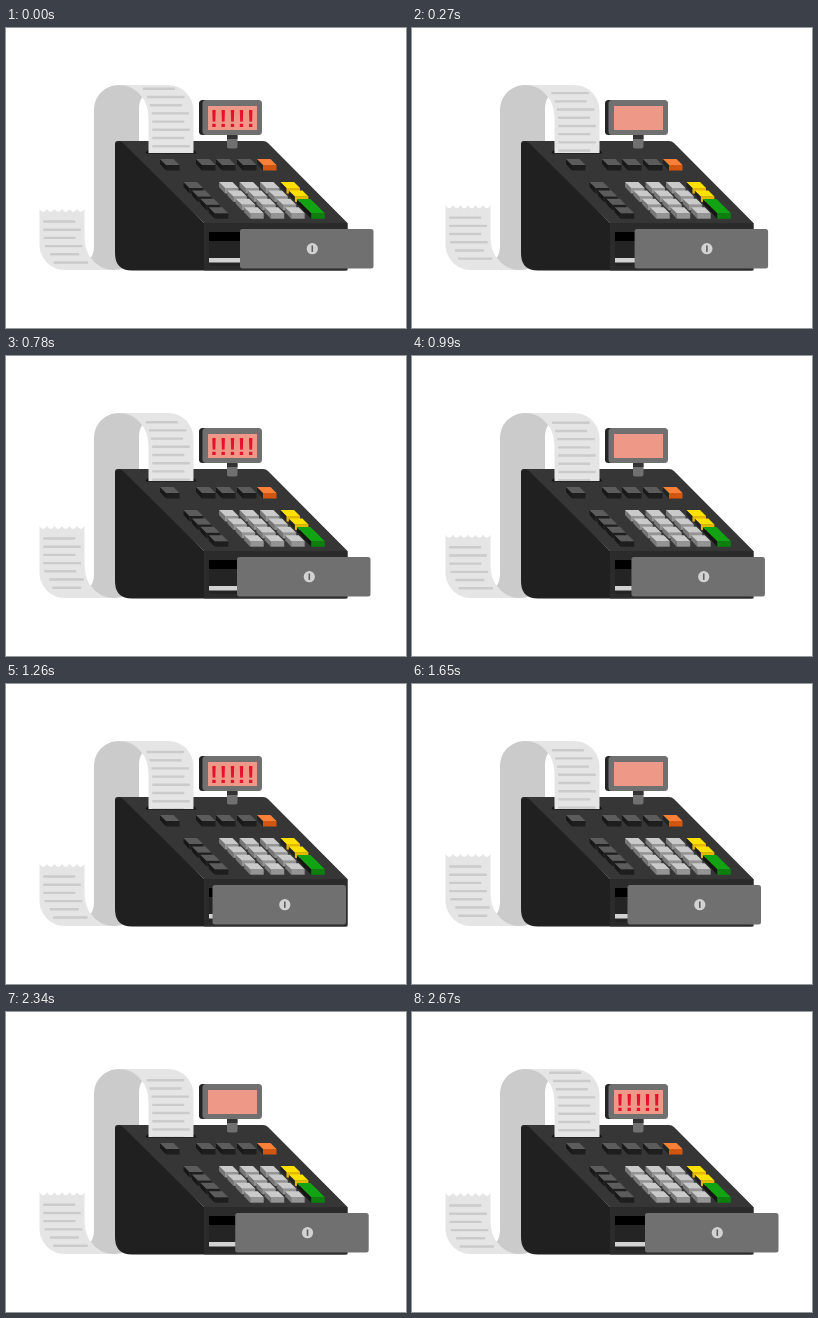
Animation of 400x300 px, one loop 2.7 s. Source, as an HTML page:

```html
<!DOCTYPE html>
<html lang="en">
<head>
<meta charset="utf-8">
<title>Cash register</title>
<style>
  html, body { margin: 0; width: 100%; height: 100%; overflow: hidden; background: #fff; }
  svg { display: block; width: 100vw; height: 100vh; }
  text { font: bold 24px "Liberation Sans", Arial, sans-serif; text-anchor: middle; fill: #e8112d; }
</style>
</head>
<body>
<svg viewBox="0 0 400 300">
  <defs>
    <path id="back" d="M88 150V82C88 68 99 57 113 57H135L138 67C134 71 133 76 133 82V150Z"/>
    <path id="sheet" d="M113 57H162C176 57 187.500 68 187.500 83V125H142.500V92C142.500 81 140 73 135 68C130 61 122 57 113 57Z"/>
    <clipPath id="stripClip"><use href="#sheet"/></clipPath>
    <clipPath id="tailClip"><path id="tailShape"/></clipPath>
  </defs>

  <g fill="#cbcbcb">
    <use href="#back"/>
    <use href="#back" transform="rotate(180 110.500 149.500)"/>
  </g>
  <path id="tail" fill="#e5e5e5"/>
  <g clip-path="url(#tailClip)"><path id="tailLines" fill="#cbcbcb"/></g>

  <path fill="#363636" d="M112 113H257Q260 113 262 115L341.500 195V242.500H198V195Z"/>
  <path fill="#2b2b2b" d="M198 195H341.500V240Q341.500 242.500 339 242.500H198Z"/>
  <path fill="#202020" d="M109 116Q109 113 112 113Q115 113 117 115L198 195V242.500H126Q109 242.500 109 225Z"/>
  <path fill="#111" d="M141 122.500H188.500L190.500 125.500H139.500Z"/>

  <use href="#sheet" fill="#e5e5e5"/>
  <g clip-path="url(#stripClip)"><path id="stripLines" fill="#cbcbcb"/></g>

  <g id="keys"></g>

  <rect x="221" y="106" width="10.500" height="14.500" rx="2" fill="#707070"/>
  <rect x="221" y="106" width="10.500" height="5" fill="#333"/>
  <rect x="193" y="72" width="20" height="35" rx="3.500" fill="#242424"/>
  <rect x="196.500" y="72" width="59.500" height="35" rx="3.500" fill="#707070"/>
  <rect x="202" y="78" width="49" height="24" fill="#ee9988"/>
  <text id="alarm" x="208 217.200 226.400 235.600 244.800" y="99">!!!!!</text>

  <rect x="203" y="204" width="136" height="34" fill="#242424"/>
  <rect x="203" y="204" width="136" height="9" fill="#000"/>
  <rect x="203" y="230" width="136" height="4.500" fill="#d2d2d2"/>
  <g id="drawer">
    <rect y="201" width="133.500" height="39.500" rx="2.500" fill="#707070"/>
    <circle cx="72.300" cy="220.700" r="5.600" fill="#d2d2d2"/>
    <rect x="71.500" y="217.500" width="1.600" height="6.400" fill="#606060"/>
  </g>
</svg>
<script>
const LOOP = 2700, STEP = 30, PITCH = 8.2;
const $ = id => document.getElementById(id);

// [time, value]: left edge of the drawer and top of the paper's loose end
const drawerKeys = [[0, 234], [30, 234.2], [400, 218], [510, 226], [690, 232], [780, 231],
  [1080, 214], [1260, 206.5], [1320, 206.5], [1650, 215.5], [2010, 225], [2160, 227.3], [2670, 233]];
const paperKeys = [[0, 182], [510, 173], [680, 170.6], [780, 171], [1095, 182.6], [1260, 181],
  [1650, 171], [1720, 170.7], [2010, 176], [2520, 182.5], [2670, 182]];

// Smooth periodic curve through the keys, without overshoot
function curve(keys) {
  const n = keys.length;
  const at = i => {
    const k = keys[(i + n) % n];
    return [k[0] + LOOP * Math.floor(i / n), k[1]];
  };
  const slope = i => {
    const [a, b] = [at(i), at(i + 1)];
    return (b[1] - a[1]) / (b[0] - a[0]);
  };
  const tangent = i => {
    const p = slope(i - 1), q = slope(i);
    return p * q <= 0 ? 0 : 2 * p * q / (p + q);
  };
  return t => {
    let i = n - 1;
    while (keys[i][0] > t) i--;
    const [t0, v0] = at(i), [t1, v1] = at(i + 1);
    const h = t1 - t0, u = (t - t0) / h, w = 1 - u;
    return v0 * (1 + 2 * u) * w * w + v1 * u * u * (3 - 2 * u)
      + h * u * w * (w * tangent(i) - u * tangent(i + 1));
  };
}
const drawerX = curve(drawerKeys), paperTop = curve(paperKeys);

function drawKeys() {
  const parts = [];
  const key = (x, y, top, front, side, d = 6) => {
    const poly = (points, fill) => parts.push(`<polygon points="${points}" fill="${fill}"/>`);
    const X = x + d, Y = y + d;
    poly([x, y, X, Y, X, Y + 5.5, x, y + 5], side);
    poly([X, Y, X + 13.5, Y, X + 13.5, Y + 5.5, X, Y + 5.5], front);
    poly([x, y, x + 13.5, y, X + 13.5, Y, X, Y], top);
  };
  const dark = ["#5c5c5c", "#1e1e1e", "#181818"];
  const light = ["#cacaca", "#949494", "#777"];
  const yellow = ["#ffe100", "#e5b800", "#222"];
  for (const x of [154, 190, 210, 231]) key(x, 131, ...dark);
  key(251, 131, "#fa7f38", "#d2560f", "#222");
  for (let r = 0; r < 4; r++) {
    const y = 154 + r * 8.4, dx = r * 8.4;
    key(177.5 + dx, y, ...dark);
    for (let c = 0; c < 3; c++) key(213 + dx + c * 20.5, y, ...light);
    if (r < 2) key(274.5 + dx, y, ...yellow);
  }
  key(291, 171, "#12a312", "#0c7f0c", "#151515", 14.3);
  $("keys").innerHTML = parts.join("");
}

const bar = (x, y, w) => `M${x} ${y - 1.2}h${w}v2.400h${-w}z`;
const width = k => k & 1 ? 37.5 : 32;

function stripBars(top) {
  let d = "";
  for (let k = -3; k < 10; k++) {
    const y = top - 104.8 + k * PITCH;
    if (y < 60.5) continue;
    const bend = Math.max(0, 95 - y) / 32;
    d += bar(146.3 - 8 * bend * bend, y, width(k));
  }
  return d;
}

function tailBars(top) {
  let d = "";
  for (let k = 0; k < 8; k++) {
    const y = top + 11.5 + k * PITCH;
    if (y > 237.5) break;
    const bend = Math.max(0, y - 204) / 32;
    d += bar(37.3 + 8 * bend * bend + (y > 222 ? 3 : 0), y, width(k) - (y > 222 ? 3 : 0));
  }
  return d;
}

function tailPath(top) {
  return `M33.500 ${top - 1}` + "q3.750 6 7.500 0".repeat(6)
    + "V207C78.500 218 81 226 86 231C91 238 99 242 108 242H59C45 242 33.500 231 33.500 216Z";
}

function draw(t) {
  const top = paperTop(t), shape = tailPath(top);
  $("tail").setAttribute("d", shape);
  $("tailShape").setAttribute("d", shape);
  $("tailLines").setAttribute("d", tailBars(top));
  $("stripLines").setAttribute("d", stripBars(top));
  $("drawer").setAttribute("transform", `translate(${drawerX(t)} 0)`);
  const blink = t % (LOOP / 4);
  $("alarm").setAttribute("visibility", blink >= 225 && blink < 562 ? "hidden" : "visible");
}

drawKeys();
draw(0);
let start;
function tick(now) {
  start ??= now;
  draw(Math.floor((now - start) % LOOP / STEP) * STEP);
  requestAnimationFrame(tick);
}
requestAnimationFrame(tick);
</script>
</body>
</html>
```
